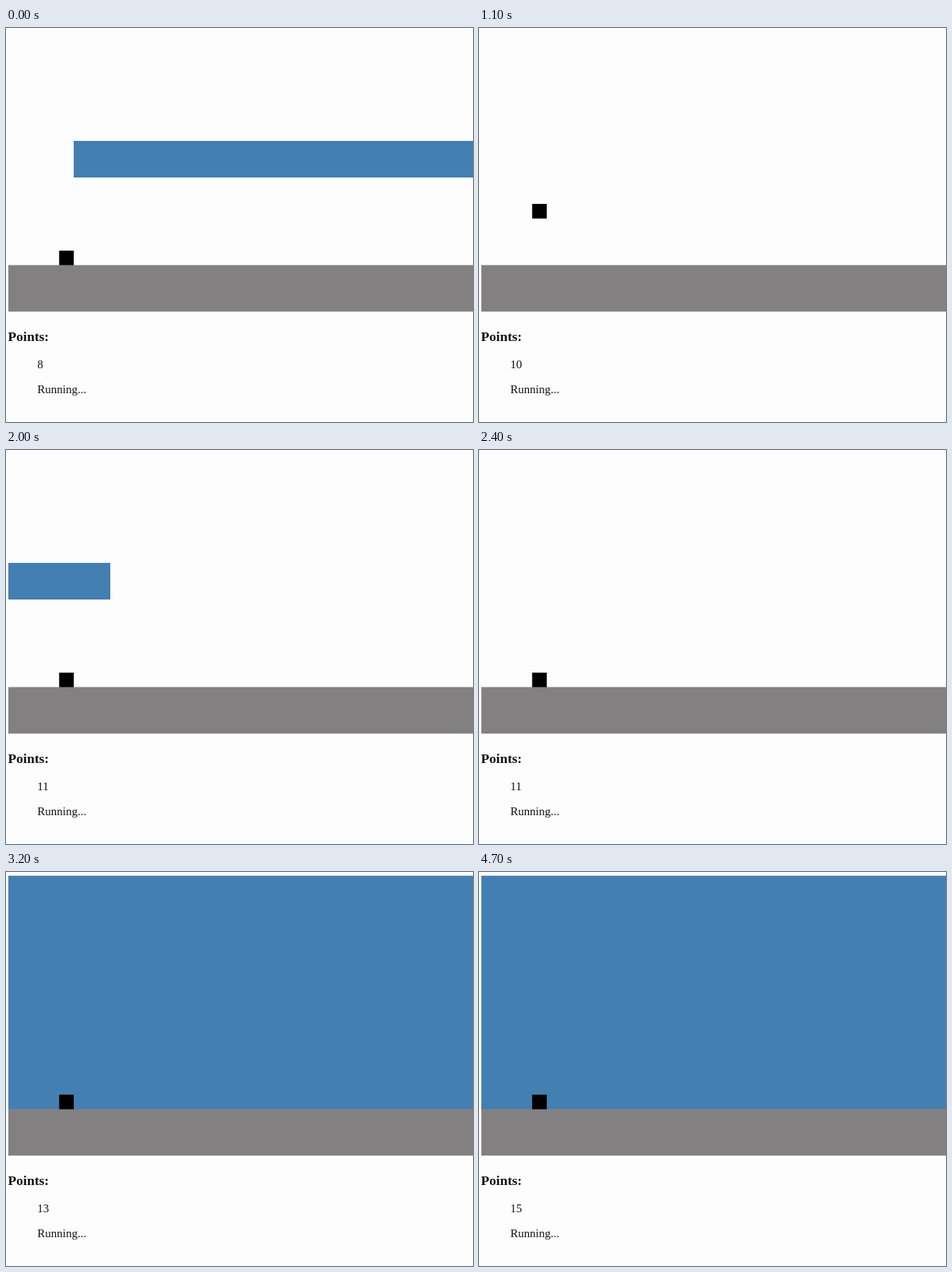
An HTML page that plays this animation: 600x506 px, repeating every 5000 ms.

```html
<!DOCTYPE html>
<html lang="en">
<head>
<meta charset="utf-8">
<title>Jumping block</title>
<style>
  html, body { margin: 0; width: 100%; height: 100%; overflow: hidden; background: #fefdfe; }
  svg { display: block; width: 600px; height: 506px; }
  text { font: 15px "Liberation Serif", "Times New Roman", serif; fill: #111; }
  .title { font-size: 17.55px; font-weight: bold; }
  .wall { fill: #447fb2; }
</style>
</head>
<body>
<svg viewBox="0 0 600 506">
  <defs><clipPath id="field"><rect x="3" y="4.5" width="597" height="360"/></clipPath></defs>
  <g clip-path="url(#field)">
    <rect id="sky" class="wall" x="3" y="4.5" width="600" height="300.5"/>
    <rect x="3" y="304.5" width="600" height="60" fill="#828081"/>
    <rect id="bar1" class="wall" y="145" width="600" height="47"/>
    <rect id="bar2" class="wall" y="145" width="600" height="47"/>
    <rect id="block" class="wall" y="259" width="23" height="46.5"/>
    <rect id="player" x="68.3" y="285.9" width="18.75" height="18.75"/>
  </g>
  <text class="title" x="2.6" y="402">Points:</text>
  <text id="points" x="40.3" y="437">8</text>
  <text x="40.3" y="469">Running...</text>
</svg>
<script>
  const LOOP = 5000, TICK = 100;
  const SPEED = 1.2; // px per ms
  const JUMP_HEIGHT = 61.7, JUMP_HALF = 300;
  const jumpPeaks = [1050, 2850, 4050];
  const scoreTimes = [100, 1100, 1700, 2700, 3200, 3500, 4500];

  const el = id => document.getElementById(id);
  const [sky, bar1, bar2, block, player, points] =
    ["sky", "bar1", "bar2", "block", "player", "points"].map(el);

  // Scroll left, passing x at time when
  const scroll = (node, t, x, when) => node.setAttribute("x", x - SPEED * (t - when));

  const jump = t => Math.max(0, ...jumpPeaks.map(
    peak => JUMP_HEIGHT * (1 - ((t - peak) / JUMP_HALF) ** 2)));

  function draw(t) {
    scroll(bar1, t, 87, 0);
    scroll(block, t, 579.5, 600);
    scroll(bar2, t, 134, 1500);
    sky.setAttribute("visibility", t >= 2500 ? "visible" : "hidden");
    player.setAttribute("y", 285.9 - jump(t));
    points.textContent = 8 + scoreTimes.filter(s => t >= s).length;
  }

  const start = performance.now();
  function frame() {
    const t = (performance.now() - start) % LOOP;
    draw(Math.floor(t / TICK) * TICK);
    requestAnimationFrame(frame);
  }
  frame();
</script>
</body>
</html>
```
